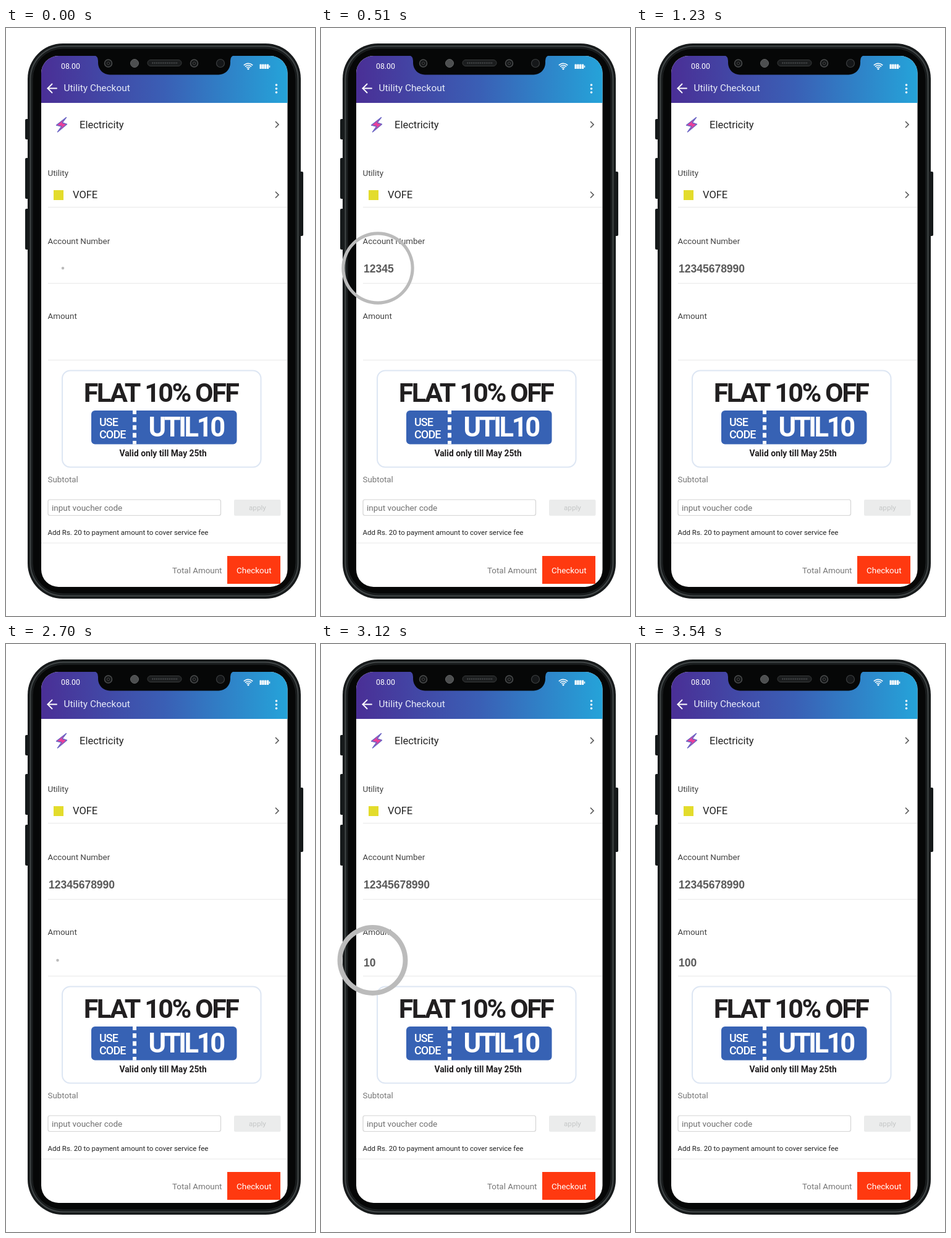
Write an HTML page with a canvas that moves like this. It is 500x950 px and loops after 4320 ms.

```html
<!DOCTYPE html>
<html lang="en">
<head>
<meta charset="utf-8">
<title>Utility checkout</title>
<style>
  html, body { margin: 0; width: 100%; height: 100%; overflow: hidden; background: #fff; }
  canvas { display: block; width: 500px; height: 950px; }
</style>
</head>
<body>
<canvas id="stage" width="500" height="950"></canvas>
<script>
const ctx = document.getElementById('stage').getContext('2d');
const LOOP = 4320;
const STEP = 30;
const RIPPLE = 840;
const ROBOTO = 'Roboto, sans-serif';
const DIGITS = '"Liberation Sans", Arial, sans-serif';

function box(x, y, w, h, r, fill, stroke, lineWidth = 1) {
  ctx.beginPath();
  ctx.roundRect(x, y, w, h, r);
  paint(fill, stroke, lineWidth);
}

function disc(x, y, r, fill, stroke, lineWidth = 1) {
  ctx.beginPath();
  ctx.arc(x, y, r, 0, Math.PI * 2);
  paint(fill, stroke, lineWidth);
}

function paint(fill, stroke, lineWidth) {
  if (fill) {
    ctx.fillStyle = fill;
    ctx.fill();
  }
  if (stroke) {
    ctx.strokeStyle = stroke;
    ctx.lineWidth = lineWidth;
    ctx.stroke();
  }
}

function line(color, width, ...points) {
  ctx.beginPath();
  points.forEach(([x, y]) => ctx.lineTo(x, y));
  paint(null, color, width);
}

function text(str, x, y, size, color, { weight = 400, family = ROBOTO, align = 'left', spacing = 0 } = {}) {
  ctx.font = `${weight} ${size}px ${family}`;
  ctx.letterSpacing = `${spacing}px`;
  ctx.textAlign = align;
  ctx.fillStyle = color;
  ctx.fillText(str, x, y);
}

function drawBody() {
  const button = '#15191a';
  [[147, 33], [210, 66], [292, 66]].forEach(([y, h]) => box(31, y, 8, h, 2, button));
  box(473, 232, 8, 104, 2, button);

  box(35, 25, 442, 897, 57, '#171a1b');
  box(39.5, 29.5, 433, 888, 53, null, '#414647', 2);
  box(43, 33, 426, 881, 49, '#060707', '#1f2324');
  box(57, 45, 398.5, 858, 28, '#fff');
}

function drawHeader() {
  const sweep = ctx.createLinearGradient(57, 0, 455, 0);
  sweep.addColorStop(0, '#4a2f96');
  sweep.addColorStop(0.5, '#3a5fb5');
  sweep.addColorStop(1, '#25a3d9');
  box(57, 45, 398.5, 76, [28, 28, 0, 0], sweep);

  text('08.00', 89, 66, 12.3, '#fff');
  drawWifi(392, 67);
  for (let i = 0; i < 4; i++) box(410.5 + i * 3.8, 58.5, 3.2, 7.5, 0.6, '#fff');
  box(425.7, 60.5, 1.5, 3.5, 0.5, '#fff');

  ctx.lineCap = 'round';
  line('#fff', 1.9, [67.5, 97.5], [82, 97.5]);
  line('#fff', 1.9, [74.5, 90.5], [67.5, 97.5], [74.5, 104.5]);
  ctx.lineCap = 'butt';
  text('Utility Checkout', 93.5, 101.5, 15.4, '#e6ebf8');
  [92, 98, 104].forEach(y => disc(437.5, y, 1.8, '#fff'));
}

function drawWifi(x, y) {
  [3.8, 6.8, 9.8].forEach(r => {
    ctx.beginPath();
    ctx.arc(x, y, r, -Math.PI * 0.76, -Math.PI * 0.24);
    paint(null, '#fff', 1.6);
  });
  disc(x, y - 0.8, 1.4, '#fff');
}

function drawNotch() {
  ctx.beginPath();
  ctx.moveTo(142, 44);
  ctx.quadraticCurveTo(149, 45, 149, 53);
  ctx.arcTo(149, 75.5, 169, 75.5, 19);
  ctx.arcTo(363, 75.5, 363, 55, 19);
  ctx.lineTo(363, 53);
  ctx.quadraticCurveTo(363, 45, 370, 44);
  ctx.closePath();
  paint('#060707');

  [165.5, 304.5].forEach(x => {
    disc(x, 57, 6, '#151718', '#4b4d4e', 1.5);
    disc(x, 57, 2, '#080808', '#4a4c4d');
  });
  disc(208, 57, 6.5, '#4d4f50', '#626465');
  disc(347, 57, 6.5, '#151719', '#3c3f40', 1.2);
  box(229, 51.5, 55, 10, 5, '#1b1d1e', '#393b3c');
  ctx.setLineDash([1.5, 1.5]);
  line('#424546', 3, [235, 56.5], [278, 56.5]);
  ctx.setLineDash([]);
}

function chevron(y) {
  line('#555', 1.6, [436, y - 5], [441, y], [436, y + 5]);
}

function drawBolt() {
  ctx.beginPath();
  [[97.5, 144.5], [81.5, 157], [90, 159], [83.5, 168], [98.5, 155.5], [91, 153]]
    .forEach(([x, y]) => ctx.lineTo(x, y));
  ctx.closePath();
  ctx.lineJoin = 'round';
  paint('#e8409a', '#6a63c4', 1.4);
  ctx.lineJoin = 'miter';
}

function drawForm() {
  drawBolt();
  text('Electricity', 119, 161.5, 16.5, '#222');
  chevron(156);

  text('Utility', 67.5, 239, 13.4, '#444');
  box(77, 262, 16, 16, 0, '#e3dc2c');
  text('VOFE', 108, 275, 16.5, '#222');
  chevron(269.5);

  text('Account Number', 67.5, 349, 13.4, '#444');
  text('Amount', 67.5, 470, 13.4, '#444');
  [289.5, 412.5, 536.5].forEach(y => line('#e8e8e8', 1, [68, y], [455, y]));
}

function drawCoupon() {
  const bold = { weight: 700 };
  const label = { weight: 500, spacing: -0.9 };
  box(91, 553.5, 321.5, 156, 13, '#fff', '#dde6f3', 2);
  text('FLAT 10% OFF', 250.5, 604, 43, '#211f20', { ...bold, align: 'center', spacing: -2.5 });

  box(138, 618, 235.5, 54.5, 6, '#3762b4');
  text('USE', 151, 642.5, 18, '#fff', label);
  text('CODE', 151, 663, 18, '#fff', label);
  ctx.setLineDash([7.5, 5.1]);
  ctx.lineDashOffset = 1.5;
  line('#fff', 6, [208, 618], [208, 672.5]);
  ctx.setLineDash([]);
  text('UTIL10', 230.5, 660, 43.5, '#fff', { ...bold, spacing: -3.4 });
  text('Valid only till May 25th', 183.5, 692, 13.8, '#211f20', bold);
}

function drawFooter() {
  text('Subtotal', 67.5, 733.5, 13.3, '#777');
  box(68, 762, 279.5, 25.5, 3, '#fff', '#d4d4d4', 1.2);
  text('input voucher code', 74, 779.5, 13.5, '#707070');
  box(369, 762, 75.5, 26, 2, '#ebecec');
  text('apply', 393, 779, 11.7, '#c5c7c7');
  text('Add Rs. 20 to payment amount to cover service fee', 67.5, 819, 11.5, '#222');

  line('#e8e8e8', 1, [57, 832], [455, 832]);
  text('Total Amount', 269, 881, 13.4, '#777');
  box(358, 853, 86, 45, 0, '#ff3910');
  text('Checkout', 373, 881, 13.45, '#fff');
}

// Types one character every 120 ms, starting at `start`.
function typed(str, y, time, start) {
  const count = Math.max(0, Math.floor((time - start) / 120) + 1);
  text(str.slice(0, count), 69, y, 17.5, '#5a5a5a', { weight: 700, family: DIGITS });
}

// The outer edge eases out while the band thins to nothing.
function ripple(x, y, age) {
  if (age < 0 || age >= RIPPLE) return;
  const outer = 61 * (1 - Math.exp(-0.00634 * (age + 6)));
  const band = 27.5 * Math.pow(1 - age / RIPPLE, 1.8);
  const inner = Math.max(0, outer - band);
  ctx.beginPath();
  ctx.arc(x, y, outer, 0, Math.PI * 2);
  ctx.arc(x, y, inner, 0, Math.PI * 2, true);
  ctx.fillStyle = '#bbb';
  ctx.fill();
}

function draw(time) {
  ctx.fillStyle = '#fff';
  ctx.fillRect(0, 0, 500, 950);
  drawBody();
  drawHeader();
  drawNotch();
  drawForm();
  drawCoupon();
  drawFooter();
  ripple(92, 388, time);
  ripple(83.5, 511, time - 2700);
  typed('12345678990', 394.5, time, 30);
  typed('100', 520.5, time, 2910);
}

const started = performance.now();
function tick() {
  const time = (performance.now() - started) % LOOP;
  draw(Math.floor(time / STEP) * STEP);
  requestAnimationFrame(tick);
}
tick();
</script>
</body>
</html>
```
